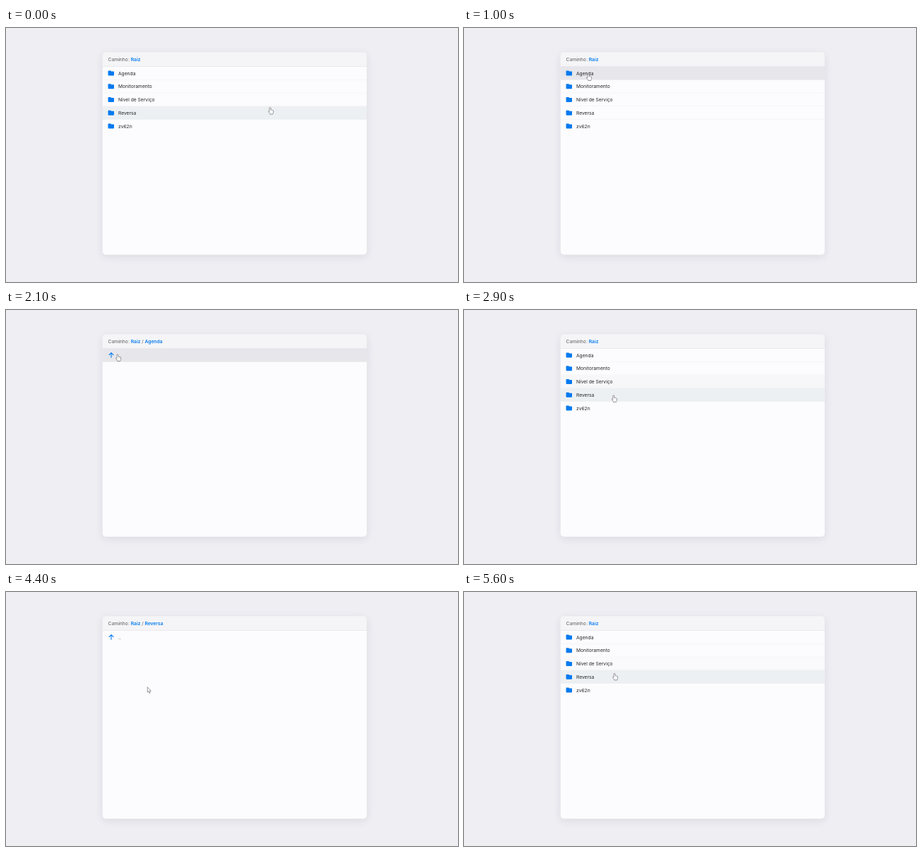
Recreate the animation shown at these times as an HTML page with a canvas. Size 640 px wide and 360 px high, loop 5700 ms.

```html
<!DOCTYPE html>
<html lang="pt">
<head>
<meta charset="utf-8">
<title>Pastas</title>
<style>
html, body { margin: 0; width: 100%; height: 100%; overflow: hidden; background: #eeeef3; }
canvas { display: block; width: 640px; height: 360px; }
</style>
</head>
<body>
<canvas id="stage"></canvas>
<script>
const LOOP = 5700, STEP = 100;
const CARD = { x: 136.5, y: 34, w: 374.5, h: 287.5, r: 5 };
const ROW_TOP = 54.8, ROW_H = 18.75;
const FOLDERS = ["Agenda", "Monitoramento", "Nível de Serviço", "Reversa", "zv62n"];
const BLUE = "#047aef", GRAY = "#717176";

const canvas = document.getElementById("stage");
const ctx = canvas.getContext("2d");
const dpr = window.devicePixelRatio || 1;
canvas.width = 640 * dpr;
canvas.height = 360 * dpr;

// Each move eases from wherever the pointer rests
const START = { x: 374, y: 112.7 };
const MOVES = [
  { from: 0, to: 900, x: 176, y: 65 },
  { from: 1400, to: 2100, x: 158, y: 63 },
  { from: 2500, to: 3000, x: 214, y: 123.5 },
  { from: 3000, to: 3300, x: 205, y: 140 },
  { from: 3300, to: 3600, x: 203, y: 124 },
  { from: 3900, to: 4100, x: 201, y: 139 },
  { from: 4100, to: 4400, x: 200.3, y: 134.7 },
  { from: 4500, to: 4900, x: 160, y: 63 },
  { from: 5000, to: 5600, x: 213, y: 115.4 }
];

// A folder is pressed, then open until its ".." row is followed
const VISITS = [
  { name: "Agenda", press: 900, open: 1400, close: 2500 },
  { name: "Reversa", press: 3500, open: 3900, close: 5000 }
];

const easeOut = u => 1 - (1 - u) ** 2;
const clamp = u => Math.min(1, Math.max(0, u));

function pointer(t) {
  let { x, y } = START;
  for (const m of MOVES) {
    const k = easeOut(clamp((t - m.from) / (m.to - m.from)));
    x += (m.x - x) * k;
    y += (m.y - y) * k;
  }
  return { x, y };
}

const openVisit = t => VISITS.find(v => t >= v.open && t < v.close);

function rowAt(t) {
  const row = Math.floor((pointer(t).y - ROW_TOP) / ROW_H);
  const count = openVisit(t) ? 1 : FOLDERS.length;
  return row >= 0 && row < count ? row : -1;
}

// The pressed look stays while the pointer has not left the row
function pressedRow(t) {
  const visit = VISITS.find(v => t >= v.press && t < v.close);
  if (!visit) return -1;
  const settled = t < visit.open || visit.name === "Agenda" || t >= visit.close - STEP;
  return settled ? rowAt(t) : -1;
}

// Share of the recent past that the pointer spent on a row
function hoverShare(row, t, span) {
  const n = 20;
  let hits = 0;
  for (let i = 0; i < n; i++) {
    if (rowAt(Math.max(0, t - span * i / n)) === row) hits++;
  }
  return hits / n;
}

// Quick fade in, slower fade out
const hoverLevel = (row, t) => Math.max(hoverShare(row, t, 80), hoverShare(row, t, 220));

function text(str, x, y, color, weight = 400) {
  ctx.font = `${weight} 6.7px Inter, sans-serif`;
  ctx.fillStyle = color;
  ctx.fillText(str, x, y);
  return x + ctx.measureText(str).width;
}

function cardPath() {
  ctx.beginPath();
  ctx.roundRect(CARD.x, CARD.y, CARD.w, CARD.h, CARD.r);
}

function drawCard() {
  ctx.save();
  ctx.shadowColor = "rgba(30, 30, 50, 0.09)";
  ctx.shadowBlur = 12 * dpr;
  ctx.shadowOffsetY = 3 * dpr;
  ctx.fillStyle = "#fcfbfd";
  cardPath();
  ctx.fill();
  ctx.restore();
}

function drawHeader(folder) {
  ctx.fillStyle = "#f5f5f7";
  ctx.fillRect(CARD.x, CARD.y, CARD.w, 20.3);
  ctx.fillStyle = "#e4e4e8";
  ctx.fillRect(CARD.x, 54.2, CARD.w, 0.7);
  let x = text("Caminho: ", 144.5, 46.7, GRAY, 500);
  x = text("Raiz", x, 46.7, BLUE, 600);
  if (folder) {
    x = text(" / ", x, 46.7, GRAY, 500);
    text(folder, x, 46.7, BLUE, 600);
  }
}

function drawFolderIcon(y) {
  ctx.fillStyle = BLUE;
  ctx.beginPath();
  ctx.roundRect(144.5, y - 3.6, 4.4, 3, 0.8);
  ctx.roundRect(144.5, y - 2.6, 8.5, 6, 0.8);
  ctx.fill();
}

function drawUpIcon(y) {
  ctx.strokeStyle = BLUE;
  ctx.lineWidth = 1.1;
  ctx.lineCap = ctx.lineJoin = "round";
  ctx.beginPath();
  ctx.moveTo(149, y + 3.2);
  ctx.lineTo(149, y - 3.2);
  ctx.moveTo(146, y - 0.3);
  ctx.lineTo(149, y - 3.3);
  ctx.lineTo(152, y - 0.3);
  ctx.stroke();
}

function drawRows(t, folder) {
  const names = folder ? [".."] : FOLDERS;
  const pressed = pressedRow(t);
  names.forEach((name, i) => {
    const top = ROW_TOP + i * ROW_H, mid = top + ROW_H / 2;
    ctx.globalAlpha = i === pressed ? 1 : hoverLevel(i, t);
    ctx.fillStyle = i === pressed ? "#e6e6eb" : "#edf0f2";
    ctx.fillRect(CARD.x, top, CARD.w, ROW_H);
    ctx.globalAlpha = 1;
    if (i < names.length - 1) {
      ctx.fillStyle = "#f1f1f4";
      ctx.fillRect(CARD.x, top + ROW_H - 0.7, CARD.w, 0.7);
    }
    if (folder) drawUpIcon(mid - 0.2);
    else drawFolderIcon(mid - 0.2);
    text(name, 159, mid + 2.5, "#252528");
  });
}

const HAND = new Path2D(
  "M-1 .8 Q-1 -.1 0 -.1 Q1 -.1 1 .8 V3.3 Q1.8 2.7 2.3 3.6 Q3.1 3.1 3.5 4 " +
  "Q4.6 3.7 4.6 4.8 V6.6 Q4.6 7.8 3.8 8.5 V9.5 H-.2 V8.7 L-2.3 6 " +
  "Q-2.7 5 -1.9 4.8 Q-1.4 4.8 -1 5.5 Z");
const ARROW = new Path2D("M0 0 V7.5 L1.6 6 L2.8 8.7 L4 8.2 L2.9 5.6 H5 Z");

function drawPointer(t) {
  const { x, y } = pointer(t);
  const shape = rowAt(t) >= 0 ? HAND : ARROW;
  ctx.save();
  ctx.translate(x, y);
  ctx.lineWidth = 0.7;
  ctx.lineJoin = "round";
  ctx.fillStyle = "#fafafc";
  ctx.strokeStyle = "#707076";
  ctx.fill(shape);
  ctx.stroke(shape);
  ctx.restore();
}

function draw(t) {
  const folder = openVisit(t)?.name;
  ctx.setTransform(dpr, 0, 0, dpr, 0, 0);
  ctx.fillStyle = "#eeeef3";
  ctx.fillRect(0, 0, 640, 360);
  drawCard();
  ctx.save();
  cardPath();
  ctx.clip();
  drawHeader(folder);
  drawRows(t, folder);
  ctx.restore();
  ctx.strokeStyle = "#e6e6ea";
  ctx.lineWidth = 0.5;
  cardPath();
  ctx.stroke();
  drawPointer(t);
}

const start = performance.now();
function tick() {
  const t = (performance.now() - start) % LOOP;
  draw(Math.floor(t / STEP) * STEP);
  requestAnimationFrame(tick);
}
tick();
</script>
</body>
</html>
```
